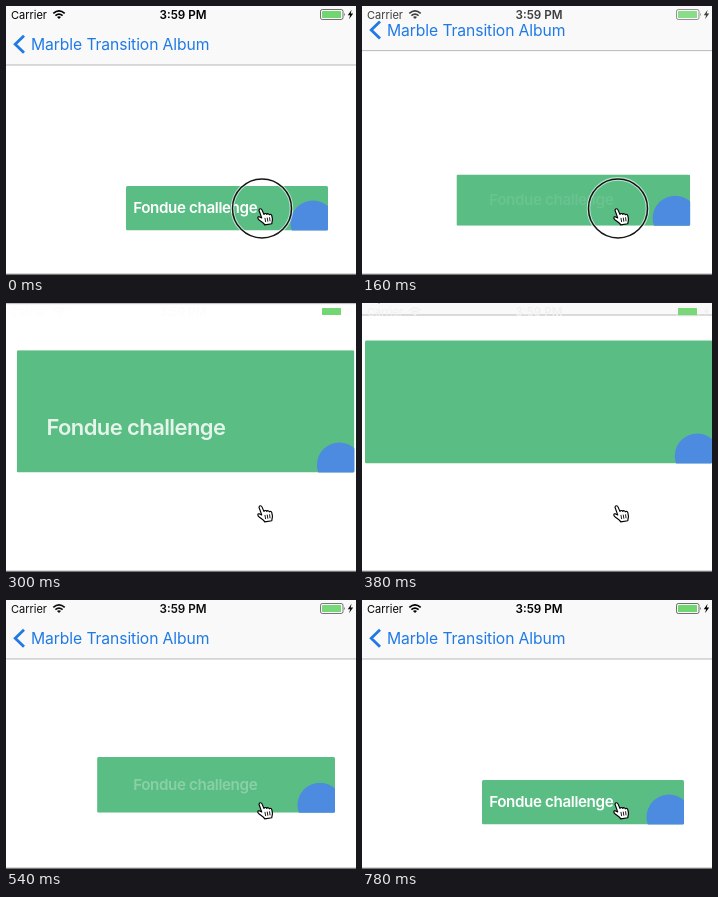
These frames come from a looping animation (350x269 px, 1.28 s). An HTML page:

```html
<!DOCTYPE html>
<html lang="en">
<head>
<meta charset="utf-8">
<title>Card expansion</title>
<style>
  html, body { margin: 0; width: 100%; height: 100%; overflow: hidden; background: #fff; }
  svg { display: block; width: 100vw; height: 100vh; }
  text { font-family: Inter, "Liberation Sans", sans-serif; white-space: pre; }
</style>
</head>
<body>
<svg viewBox="0 0 350 269">
  <defs>
    <clipPath id="clip"><rect id="clipBox" rx="1.5"/></clipPath>
  </defs>
  <rect width="350" height="269" fill="#fff"/>

  <g clip-path="url(#clip)">
    <rect id="card" fill="#5abd83"/>
    <circle id="dot" r="22.5" fill="#4d8be0"/>
    <text id="chip" x="127.2" font-size="15.2" font-weight="600" letter-spacing="-.38" fill="#fff">Fondue challenge</text>
    <text id="head" font-size="22" font-weight="600" letter-spacing="-.6" fill="#fff">Fondue challenge</text>
  </g>

  <g id="nav">
    <rect y="-70" width="350" height="129" fill="#f9f9f9"/>
    <rect y="58.5" width="350" height="1" fill="#b8b8b8"/>
    <path d="M18 29.8L9.2 38.3L18 46.8" fill="none" stroke="#1f7ae5" stroke-width="2.8"/>
    <text x="25" y="44" font-size="15.7" letter-spacing="-.1" fill="#1f7ae5">Marble Transition Album</text>
  </g>

  <g id="status">
    <text x="5" y="12.8" font-size="11">Carrier</text>
    <g fill="none" stroke="currentColor" stroke-width="1.7">
      <path d="M47.3 7.4Q53 2.4 58.7 7.4"/>
      <path d="M49.4 9.6Q53 6.5 56.6 9.6"/>
    </g>
    <path d="M51 11Q53 9.4 55 11L53 13Z"/>
    <text x="177" y="12.8" font-size="11.7" font-weight="600" text-anchor="middle">3:59 PM</text>
    <rect x="314.5" y="3.5" width="22.5" height="10" rx="1.8" fill="none" stroke="currentColor" stroke-opacity=".55"/>
    <path d="M338 6.8Q339.8 8.5 338 10.2Z" fill-opacity=".6"/>
    <path d="M345.6 3.8L341.8 9.2H344.2L343 13.2L347.2 7.6H344.7Z"/>
  </g>
  <rect id="charge" x="316" y="5" width="19" height="7" rx=".6" fill="#70d670"/>

  <rect y="267.7" width="350" height="1.3" fill="#777"/>

  <g id="ring" fill="none">
    <circle cx="256" cy="202.4" r="29.5" stroke="#fff" stroke-opacity=".6" stroke-width="3.6"/>
    <circle cx="256" cy="202.4" r="29.5" stroke="#151515" stroke-width="1.5"/>
  </g>
  <g transform="translate(-.2 -.3)" stroke="#000" stroke-width="1.15" stroke-linejoin="round" stroke-linecap="round">
    <path fill="#fff" d="M253.2 204.6C253.4 202.6 255.6 202.6 256.3 204.4L258.1 208.7C258.8 207.4 260.4 207.5 260.9 208.7C261.6 207.6 263.1 207.8 263.5 209.1C264.5 208.3 265.7 208.8 266 210L266.6 213.2C266.8 214.9 266.1 215.8 266 218L259 219.2C257.8 217 255.8 216 253.4 214.3C251.2 212.6 251.8 210.6 253.8 211.2L255.9 212.2Z"/>
    <path fill="none" stroke-width=".9" d="M259.2 212.6L259.8 216M261.5 212.3L262 215.6M263.8 212L264.2 215.2"/>
  </g>
</svg>
<script>
const LOOP = 1280, STEP = 20;
const SPEED = 5 / 6;               // playback runs a little slower than the timings below
const OPEN = 78, CLOSE = 293, RING_OFF = 260;

const small = { left: 120, right: 322, middle: 202.25, height: 44.5 };
const large = { left: 0, right: 351, middle: 75, height: 150 };

function bezier(x1, y1, x2, y2) {
  const at = (a, b, s) => 3 * (1 - s) * (1 - s) * s * a + 3 * (1 - s) * s * s * b + s * s * s;
  return x => {
    if (x <= 0 || x >= 1) return x <= 0 ? 0 : 1;
    let lo = 0, hi = 1;
    for (let i = 0; i < 24; i++) {
      const mid = (lo + hi) / 2;
      if (at(x1, x2, mid) < x) lo = mid; else hi = mid;
    }
    return at(y1, y2, lo);
  };
}
const standard = bezier(.4, 0, .2, 1);
const inOut = bezier(.42, 0, .58, 1);
const linear = x => Math.min(1, Math.max(0, x));

// [delay, duration, easing] for opening and closing
const motion = {
  width:  [[0, 285, standard], [45, 330, standard]],
  height: [[15, 360, standard], [0, 330, standard]],
  middle: [[15, 360, standard], [13, 330, standard]],
  chip:   [[0, 75, linear], [150, 150, inOut]],
  head:   [[75, 150, inOut], [0, 75, standard]],
  nav:    [[0, 200, inOut], [10, 200, inOut]],
  status: [[0, 200, inOut], [38, 200, inOut]]
};

const run = ([delay, span, ease], ms) => ease((ms - delay) / span);
const mix = (key, k) => small[key] + (large[key] - small[key]) * k;
const el = id => document.getElementById(id);
const set = (id, attrs) => {
  for (const name in attrs) el(id).setAttribute(name, attrs[name]);
};

function draw(t) {
  const opened = (t - OPEN) * SPEED, closed = (t - CLOSE) * SPEED;
  // the closing motion is added onto the still running opening motion
  const level = key => run(motion[key][0], opened) - run(motion[key][1], closed);

  const w = level('width');
  const left = mix('left', w), right = mix('right', w);
  const middle = mix('middle', level('middle'));
  const height = mix('height', level('height'));
  const bottom = middle + height / 2;
  const box = { x: left, y: middle - height / 2, width: right - left, height };

  set('card', box);
  set('clipBox', box);
  set('dot', { cx: right - 15, cy: bottom - 7.5 });
  set('chip', { y: middle + 5.2, opacity: 1 - level('chip') });
  set('head', { x: left + 29.7, y: bottom - 37.3, opacity: Math.max(0, level('head')) });
  set('nav', { transform: `translate(0 ${-59 * level('nav')})` });

  const light = level('status');
  const g = Math.round(255 * light), gray = `rgb(${g},${g},${g})`;
  set('status', { fill: gray, color: gray });
  // dark and light bars cross-fade, so the charge thins out halfway
  set('charge', { opacity: 1 - light * (1 - light) });
  set('ring', { visibility: t < RING_OFF ? 'visible' : 'hidden' });
}

const start = performance.now();
function tick() {
  const t = (performance.now() - start) % LOOP;
  draw(Math.floor(t / STEP) * STEP);
  requestAnimationFrame(tick);
}
tick();
</script>
</body>
</html>
```
